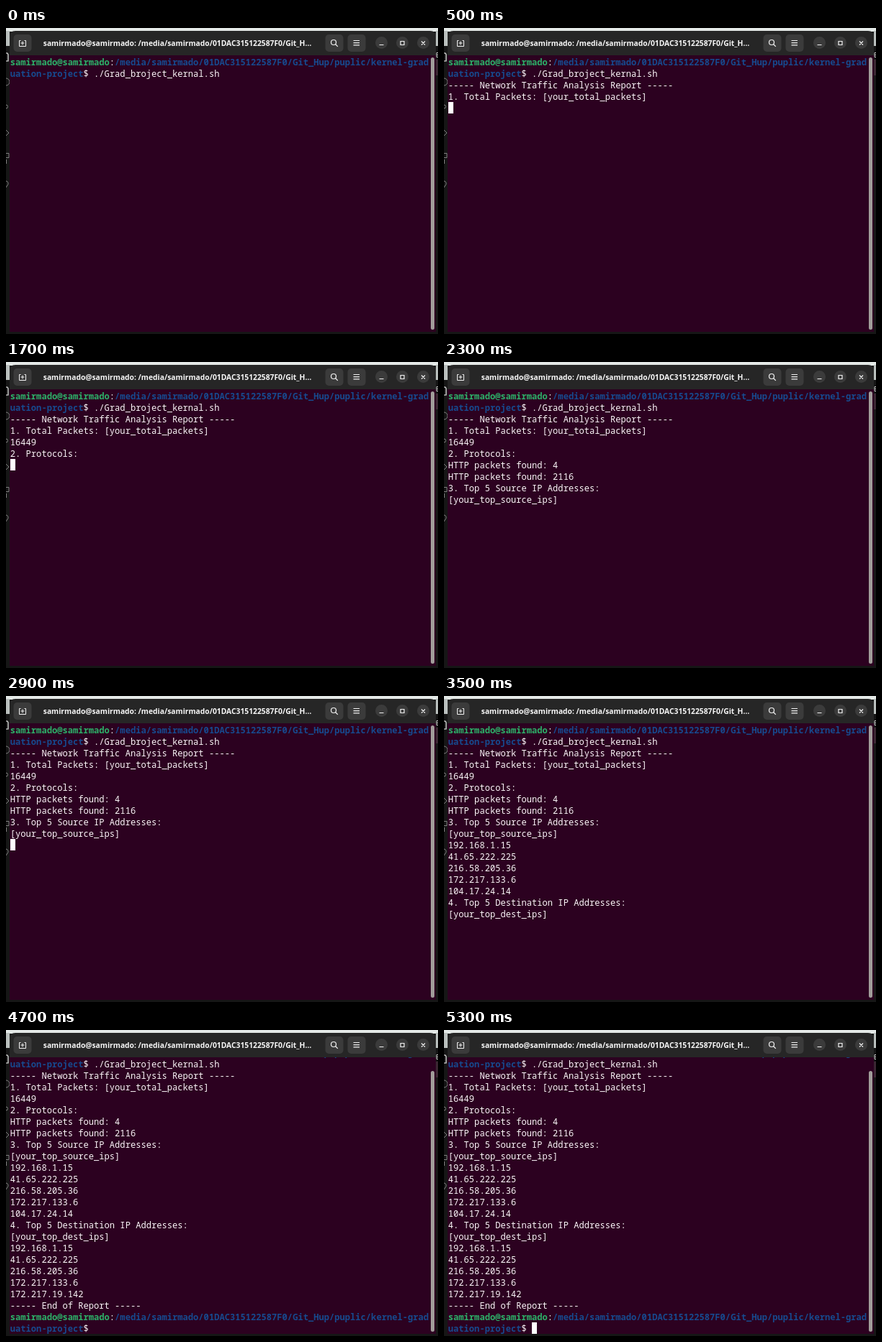
An HTML page that plays this animation: 600x426 px, repeating every 5800 ms.

```html
<!DOCTYPE html>
<html lang="en">
<head>
<meta charset="utf-8">
<title>Terminal report</title>
<style>
  html, body { margin: 0; width: 100%; height: 100%; overflow: hidden; background: #161616; }
  #stage { position: relative; width: 600px; height: 426px; overflow: hidden; }
  svg { position: absolute; inset: 0; }
  #title {
    position: absolute; left: 38px; width: 400px; top: 12px;
    text-align: center; white-space: nowrap; color: #f6f6f6;
    font: 700 10.3px/18px "Open Sans", "Noto Sans", sans-serif;
  }
  #term { position: absolute; left: 5px; top: 38px; width: 592px; height: 385px; overflow: hidden; background: #2c0120; }
  #rows {
    position: absolute; left: .8px; top: 2px; color: #fbf7f8; white-space: pre;
    font: 12.12px/16px "Noto Sans Mono", "DejaVu Sans Mono", monospace;
  }
  #rows div { height: 16px; }
  #rows b { color: #2db068; }
  #rows i { color: #174a8e; font-style: normal; font-weight: bold; }
  #cursor { position: absolute; margin-top: -1px; width: 7.4px; height: 15.5px; background: #fff; }
  #bar { position: absolute; left: 585px; width: 5px; bottom: 3px; border-radius: 3px; background: #a19d9a; }
</style>
</head>
<body>
<div id="stage">
  <svg width="600" height="426" fill="none" stroke="#f2f2f2" stroke-width="1.2">
    <g stroke="none">
      <path fill="#161616" d="M0 0h600v426H0z"/>
      <path fill="#e4e9e7" d="M0 0h600v5H0z"/>
      <path fill="#b9bfbd" d="M0 4h5v21H0zM597 4h3v21h-3z"/>
      <path fill="#3a2632" d="M597 44h3v22h-3z"/>
      <path fill="#262626" d="M5 38V12q0-8 8-8H589q8 0 8 8V38z"/>
      <g fill="#3b3b3b">
        <rect x="10.5" y="9" width="25" height="24" rx="5"/>
        <rect x="443.5" y="9" width="25" height="24" rx="5"/>
        <rect x="474.5" y="9" width="25" height="24" rx="5"/>
        <circle cx="521.5" cy="20.5" r="8.5"/>
        <circle cx="550.5" cy="20.5" r="8.5"/>
        <circle cx="579.5" cy="20.5" r="8.5"/>
      </g>
    </g>
    <path stroke-width="1" d="M20.500 17.500h-2v8h9v-8h-2M23 18.500v5M20.500 21h5"/>
    <circle cx="455" cy="20" r="3.500"/>
    <path d="M457.500 22.500l3.300 3.300M482.500 17.500h8.500M482.500 20.700h8.500M482.500 23.900h8.500"/>
    <path d="M518.500 23.500h6M548 18.500h5v5h-5zM577 18.500l5 5M582 18.500l-5 5"/>
    <path stroke="#ededed" d="M0 35h2l1 2v9H0"/>
    <g stroke="#808080" stroke-width="1">
      <path d="M0 70a5 5 0 0 1 0 10M0 107a2.500 2.500 0 0 1 0 5M0 142l4 4-4 4"/>
      <path d="M0 174.500h4v6H0M.5 183v6M0 213a3.500 3.500 0 0 1 2 6l-2 3"/>
      <path stroke="#c4c4c4" d="M600 34.500h-2v6h2M598 37.500h2"/>
    </g>
  </svg>
  <div id="title"></div>
  <div id="term">
    <div id="rows"></div>
    <div id="bar"></div>
  </div>
</div>
<script>
const LOOP = 5800, BLINK = 600, ROW = 16, SCROLL_AT = 3900;
const user = "samirmado", login = `${user}@${user}`;
const path = `/media/${user}/01DAC315122587F0/Git_Hup/puplic/kernel-grad`;
const prompt = [`<b>${login}</b>:<i>${path}</i>`, "<i>uation-project</i>$ "];
const hosts = ["192.168.1.15", "41.65.222.225", "216.58.205.36", "172.217.133.6"];

// Each step: time of output, lines printed
const steps = [
  [0, prompt[0], prompt[1] + "./Grad_broject_kernal.sh"],
  [300, "----- Network Traffic Analysis Report -----", "1. Total Packets: [your_total_packets]"],
  [1400, "16449"],
  [1500, "2. Protocols:"],
  [1800, "HTTP packets found: 4"],
  [2100, "HTTP packets found: 2116"],
  [2200, "3. Top 5 Source IP Addresses:", "[your_top_source_ips]"],
  [3000, ...hosts, "104.17.24.14", "4. Top 5 Destination IP Addresses:", "[your_top_dest_ips]"],
  [SCROLL_AT, ...hosts, "172.217.19.142", "----- End of Report -----", ...prompt]
];

const $ = id => document.getElementById(id);
const rows = $("rows"), bar = $("bar");
$("title").textContent = `${login}: /media/${user}/01DAC315122587F0/Git_H…`;

const lines = steps.flatMap(([at, ...texts]) => texts.map(html => {
  const el = document.createElement("div");
  el.innerHTML = html;
  rows.append(el);
  return { at, el };
}));
const cursor = document.createElement("span");
cursor.id = "cursor";
rows.append(cursor);

function render(t) {
  const done = t >= SCROLL_AT;
  let shown = 0;
  for (const { at, el } of lines) {
    const on = t >= at;
    el.style.visibility = on ? "visible" : "hidden";
    shown += on;
  }
  rows.style.transform = `translateY(${done ? -ROW : 0}px)`;
  bar.style.top = (done ? 19 : 3) + "px";
  cursor.style.left = done ? "16ch" : "0";
  cursor.style.top = (done ? shown - 1 : shown) * ROW + "px";
  cursor.style.visibility = Math.floor((t + 100) / BLINK) % 2 ? "visible" : "hidden";
}

const start = performance.now();
function tick() {
  render((performance.now() - start) % LOOP);
  requestAnimationFrame(tick);
}
tick();
</script>
</body>
</html>
```
